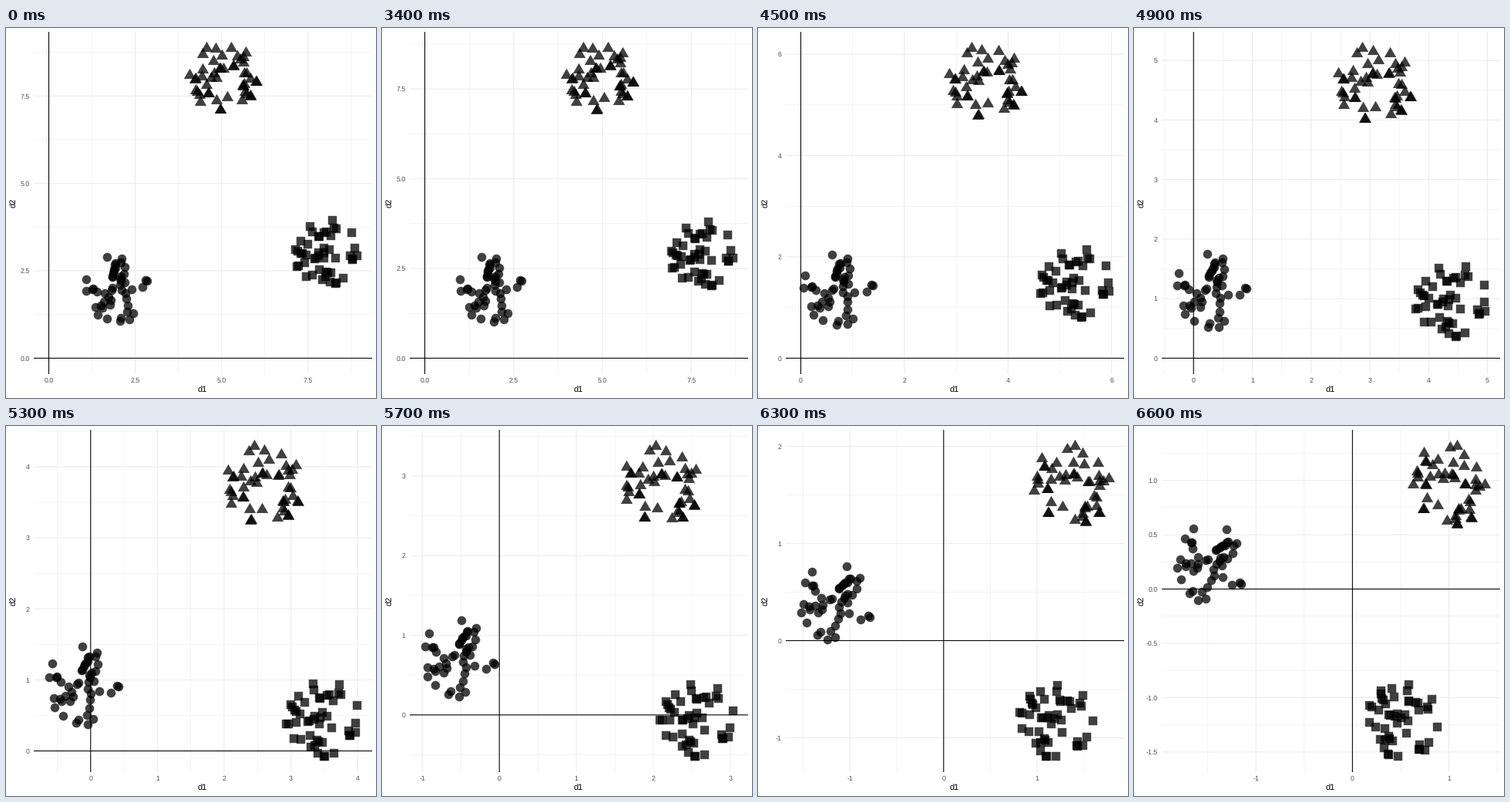
A matplotlib script that plays this animation: 480 px wide and 480 px high, repeating every 10 s.

```python
import math

import matplotlib.pyplot as plt
import numpy as np
from matplotlib.animation import FuncAnimation

SIZE, DPI = 480, 72
LEFT, RIGHT, TOP, BOTTOM = 35.6, 474.5, 5.5, 448.5
HOLD, STEPS, FRAMES = 33, 33, 100
MEAN = np.array([4.972, 4.328])
SPREAD = np.array([2.4969, 2.6754])

plt.rcParams.update({
    "font.family": "Liberation Sans",
    "path.snap": False,
    "text.hinting": "none",
})


def to_data(points, dy=0.0):
    """Turn positions on the opening view into data units."""
    x, y = np.array(points).T
    return np.column_stack([(x - 55.5) / 44.8, (428.4 - y - dy) / 45.36])


circles = to_data([
    (103.5, 326), (131.3, 297.3), (104, 341.2), (112, 339), (113, 338),
    (118, 342), (142, 305.5), (141, 307), (149.7, 298.7), (149, 303.7),
    (138, 323), (153.6, 310.5), (115.7, 362), (122.8, 360.5), (125, 362.6),
    (127.3, 355.4), (128, 344.5), (133.3, 349.2), (136, 353.5), (134.6, 359.5),
    (119, 371.8), (130.8, 377), (136.6, 339.6), (138, 337), (148.4, 333),
    (148.8, 327.6), (153.3, 319.2), (154.2, 329.8), (149.6, 340.4),
    (155, 344), (156, 351), (163, 338.6), (157.7, 360), (157, 368),
    (149, 375.8), (147.8, 380.4), (165, 370), (160, 378), (176.6, 336),
    (181, 327), (183.2, 327.6), (142, 311), (140, 313), (139.5, 315.5),
    (139, 318), (138, 322), (149, 322), (147.5, 325),
])

triangles = to_data([
    (238.2, 60.3), (254.5, 53.7), (245, 66), (246, 65.5), (254, 62.3),
    (255, 33), (259.8, 25), (272, 26.5), (280, 35.3), (269.3, 42.3),
    (291.5, 24.9), (245.5, 80.6), (250.5, 85.8), (251.5, 95), (262, 84.2),
    (263, 83.8), (260, 73.6), (265.5, 64.2), (270, 58.6), (276.5, 52.4),
    (277.5, 52), (281.5, 52.5), (273, 64), (294.5, 48.8), (295.3, 48.2),
    (299.8, 36), (304, 40.2), (308, 37.5), (310.5, 31.6), (307.5, 44.5),
    (273.3, 93.6), (287.1, 89.7), (308.5, 57.8), (311.5, 57.8), (316.5, 65.3),
    (323.6, 69.6), (324.4, 69.6), (307.2, 74.5), (308, 75), (309, 72.5),
    (309.5, 82), (311.5, 84.8), (316.8, 87.2), (317.3, 87.8), (306.2, 93.4),
    (277.6, 105.6), (278.3, 105), (248, 82),
], dy=0.7)

squares = to_data([
    (423, 249), (393.8, 257.5), (382, 275.6), (397, 264), (375.3, 287),
    (377.8, 289.5), (390.4, 280), (381.5, 292), (383.5, 292.5), (405, 270),
    (406, 270.5), (412.2, 265.3), (414.5, 263.7), (376.4, 309.2), (379, 308.2),
    (388.5, 293.8), (387, 304.2), (424.5, 258.6), (427.8, 259.8), (405, 291),
    (399.5, 299), (400.5, 298.2), (405, 294.6), (412.1, 284.8), (411.4, 290.8),
    (418.9, 287), (412.2, 298), (389, 322.3), (397, 320.3), (405.6, 313.4),
    (447.8, 265.3), (427, 298.2), (410.2, 325.7), (413.9, 322.5),
    (415, 316), (417, 317), (421.3, 316.8), (419.4, 329.5), (452.2, 284.9),
    (446.3, 295.4), (448.5, 299.8), (449.3, 299.4), (454.4, 295), (427.2, 331),
    (428, 330.5), (436.9, 324.1), (420.5, 268.7),
])


def rotate_scaled(points):
    """Standardise both variables, then project on their principal axes."""
    zx, zy = ((points - MEAN) / SPREAD).T
    return np.column_stack([zx + zy, zy - zx]) / math.sqrt(2)


def pretty_breaks(lo, hi, wanted=5):
    """Extended Wilkinson labelling: returns first break, last break, step."""
    span = hi - lo
    nice = [1, 5, 2, 2.5, 4, 3]
    best, choice = -math.inf, None
    power = math.floor(math.log10(span))
    for rank, q in enumerate(nice):
        for z in (power - 1, power):
            step = q * 10.0 ** z
            for count in range(2, 11):
                first = math.floor(hi / step) - count + 1
                for start in range(first - 1, math.ceil(lo / step) + 1):
                    a, b = start * step, (start + count - 1) * step
                    has_zero = start <= 0 <= start + count - 1
                    simple = 1 - rank / (len(nice) - 1) + has_zero
                    cover = 1 - 0.5 * ((hi - b) ** 2 + (lo - a) ** 2) / (0.1 * span) ** 2
                    ratio = ((count - 1) / (b - a)
                             * (max(b, hi) - min(a, lo)) / (wanted - 1))
                    dense = 2 - max(ratio, 1 / ratio)
                    score = 0.25 * simple + 0.2 * cover + 0.5 * dense
                    if score > best:
                        best, choice = score, (a, b, step)
    return choice


def axis_layout(values):
    lo, hi = min(0, values.min()), max(0, values.max())
    pad = 0.05 * (hi - lo)
    lo, hi = lo - pad, hi + pad
    a, b, step = pretty_breaks(lo, hi)
    major = [v for v in np.arange(a, b + step / 2, step) if lo <= v <= hi]
    minor = [v for v in np.arange(a - step / 2, b + step, step) if lo <= v <= hi]
    digits = len(f"{step:g}".partition(".")[2])
    labels = [f"{round(v, 6) + 0.0:.{digits}f}" for v in major]
    return (lo, hi), major, minor, labels


fig = plt.figure(figsize=(SIZE / DPI, SIZE / DPI), dpi=DPI, facecolor="white")
ax = fig.add_axes([LEFT / SIZE, 1 - BOTTOM / SIZE,
                   (RIGHT - LEFT) / SIZE, (BOTTOM - TOP) / SIZE])
ax.set_axisbelow(True)
for spine in ax.spines.values():
    spine.set_visible(False)
ax.tick_params(which="both", length=0)
ax.tick_params(pad=4.95, labelsize=8.8, labelcolor="#4d4d4d")
ax.grid(which="major", color="#ebebeb", linewidth=1.07)
ax.grid(which="minor", color="#ebebeb", linewidth=0.53)
ax.axhline(0, color="black", linewidth=1.07, zorder=1.5)
ax.axvline(0, color="black", linewidth=1.07, zorder=1.5)

fig.text((LEFT + RIGHT) / 2 / SIZE, 1 - 472.8 / SIZE, "d1", size=11,
         ha="center", va="baseline")
fig.text(13.8 / SIZE, 1 - (TOP + BOTTOM) / 2 / SIZE, "d2", size=11, rotation=90,
         rotation_mode="anchor", ha="center", va="baseline")

groups = []
for data, marker, width in [(circles, "o", 11.6),
                            (triangles, (3, 0, 0), 17.7),
                            (squares, "s", 11.4)]:
    dots = ax.scatter(*data.T, s=width ** 2, marker=marker, color="black",
                      alpha=0.75, linewidths=0, zorder=3)
    groups.append((dots, data, rotate_scaled(data)))


def update(frame):
    t = min(max((frame - HOLD) / STEPS, 0), 1)
    placed = [(1 - t) * start + t * end for _, start, end in groups]
    for (dots, _, _), points in zip(groups, placed):
        dots.set_offsets(points)

    xs, ys = np.vstack(placed).T
    limits, major, minor, labels = axis_layout(xs)
    ax.set_xticks(major, labels)
    ax.set_xticks(minor, minor=True)
    ax.set_xlim(limits)
    limits, major, minor, labels = axis_layout(ys)
    ax.set_yticks(major, labels, va="center_baseline")
    ax.set_yticks(minor, minor=True)
    ax.set_ylim(limits)
    return [dots for dots, _, _ in groups]


anim = FuncAnimation(fig, update, frames=FRAMES, interval=100, repeat=True,
                     repeat_delay=0, blit=False)
plt.show()
```
